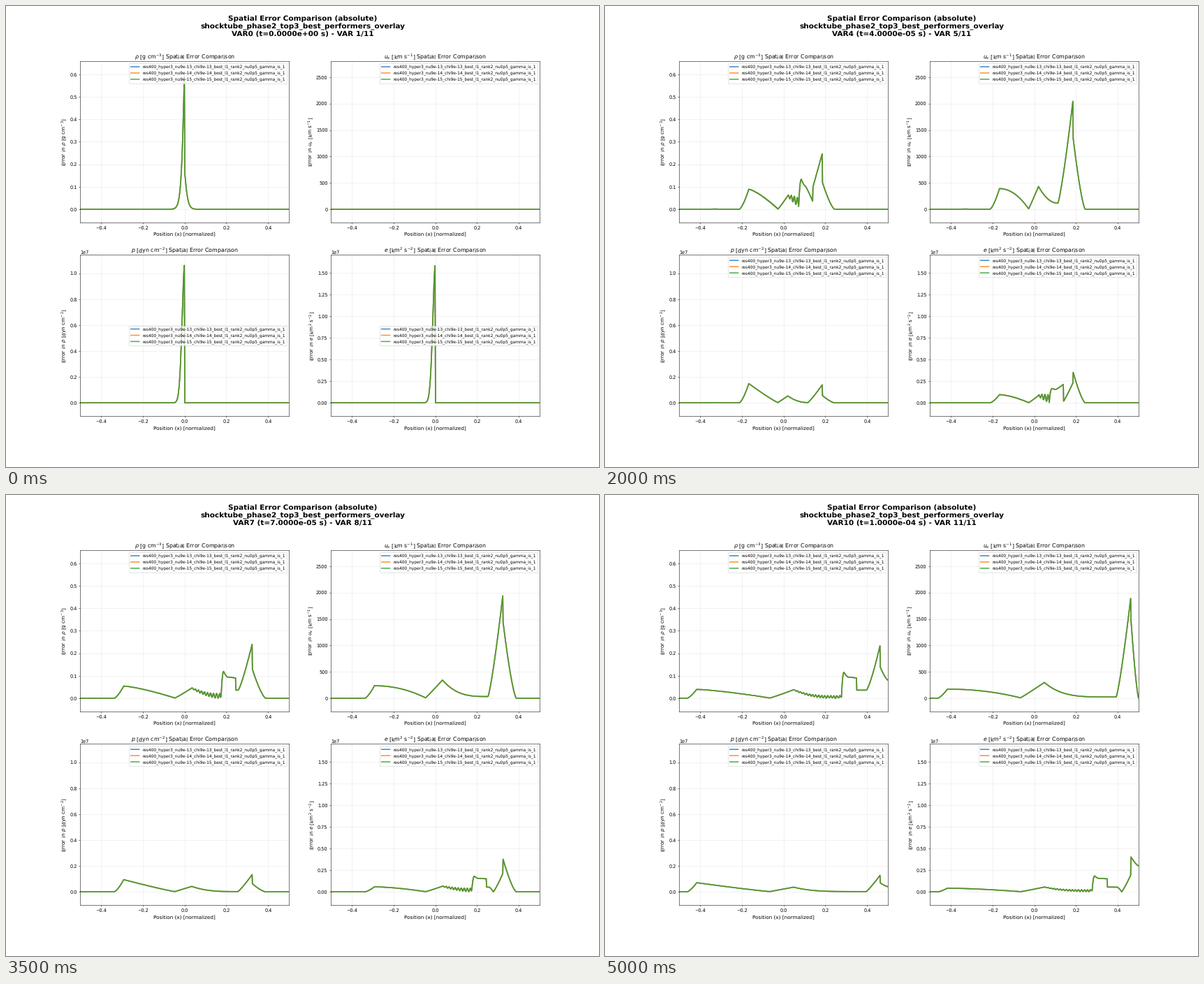
Write a matplotlib script that moves like this. It is 849 by 660 pixels and loops after 5.5 s.

```python
import numpy as np
import matplotlib.pyplot as plt
from matplotlib.animation import FuncAnimation

W, H, DPI = 849, 660, 47.15
STEPS = 11
OVERSHOOT = {1: 2, 2: 4, 6: 1}  # solver time past the output time, in ns

plt.rcParams.update({"font.family": "DejaVu Sans", "text.hinting": "none"})


def path(knots):
    """Join (x, y, bend) knots; bend > 0 starts flat, bend < 0 ends flat."""
    xs, ys = [-0.5], [0.0]
    for x, y, *bend in knots:
        x0, y0 = xs[-1], ys[-1]
        s = np.linspace(0, 1, 60)[1:] if x - x0 > 0.003 else np.ones(1)
        p = bend[0] if bend else 1
        w = s**p if p > 0 else 1 - (1 - s) ** -p
        xs.extend(x0 + (x - x0) * s)
        ys.extend(y0 + (y - y0) * w)
    return np.array(xs), np.array(ys)


# Wave positions: all of them travel at a constant speed.
def fan(k):
    return -0.0416 * k


def zero(k):
    return -0.0065 * k - 0.001


def middle(k):
    return 0.0047 * k + 0.0015


def contact(k):
    return max(0.034 * k - 0.063, zero(k) + 0.002)


def shelf(k):
    return 0.035 * k - 0.001


def plain(k):
    return 0.0465 * k - 0.07


def shock(k):
    return 0.0461 * k + 0.0005


def head(k, peak, low, bend):
    """Rarefaction: smooth rise, peak and the fall to the sign change."""
    return [(fan(k) - 0.046, 0), (fan(k), peak, 1.4 + 1.4 / k**2), (zero(k), low, bend)]


def step_wave(k, hill, base, peak, mid, end, after):
    """Central hill, contact jump, shelf and the flat stretch before the ramp."""
    j, e = contact(k), shelf(k)
    knots = []
    if middle(k) < j:
        knots = [(middle(k), hill, 1.1), (j, base, -max(1, 0.35 * k - 0.5))]
    return knots + [(j + 0.012, peak, -2.2), (j + 0.45 * (e - j), mid, -1.5),
                    (e, end, 1.2), (e + 0.0015, after),
                    (max(e, plain(k)) + 0.0016, after)]


def tail(k, top, bend, post, wall):
    """Ramp to the shock and the decay that may run into the wall."""
    foot = 0.048 * k + 0.052
    end = wall if foot > 0.5 else 0
    return [(shock(k), top, bend), (shock(k) + 0.0015, post),
            (min(foot, 0.5), end, -1.4), (0.5, end)]


def ripple(x, a, b, size, wavelength=0.0145):
    s = np.clip((x - a) / (b - a), 0, 1)
    return np.where(s < 1, -size * np.sqrt(s) * np.cos(2 * np.pi * (b - x) / wavelength), 0)


def grid_noise(k, x, size):
    """Ripples on the fan, at the contact and a faint bump ahead of the fan."""
    y = ripple(x, fan(k), zero(k), 0.015 * k**-1.5, 0.0075)
    if middle(k) < contact(k):
        y += ripple(x, middle(k), contact(k), size)
    return y


def precursor(k, x, size):
    return size * (k > 1) * np.exp(-(((x + 0.083 * k) / 0.014) ** 2))


def start_pulse(size, right, width, power):
    """Smeared initial jump at x = 0."""
    x = np.linspace(-0.5, 0.5, 400)
    y = np.exp(-((np.abs(x) / width) ** power))
    return x, np.where(x < 0, size, right) * y


def density(k):
    if k == 0:
        return start_pulse(0.63, 0.17, 0.0123, 1.2)
    knots = head(k, 0.305 * k**-0.89, 0.001, 1.35)
    knots += step_wave(k, hill=0.12 * k**-0.5, base=0.48 / k**2,
                       peak=min(0.19, 0.112 + 0.34 / k**2),
                       mid=max(0.094, 0.14 - 0.009 * k),
                       end=np.clip(0.0275 * (k - 2.7), 0.003, 0.09),
                       after=max(0.036, 0.215 - 0.029 * k))
    knots += tail(k, 0.255 - 0.0022 * k, 1 + 0.3 * np.clip(k / 4 - 1, 0, 1),
                  0.105 + 0.0033 * k, 0.08)
    x, y = path(knots)
    return x, np.abs(y + grid_noise(k, x, 0.08 / k) + precursor(k, x, 0.001))


def velocity(k):
    if k == 0:
        return np.array([-0.5, 0.5]), np.zeros(2)
    knots = head(k, 1350 * k**-0.895, 8, 2.1 - 0.8 / k**2)
    bend = -1.9
    if plain(k) > middle(k):
        bend = 1.25
        knots += [(middle(k), 750 * k**-0.4, 1.05),
                  (plain(k) - 0.003, 22 + 413 * np.exp(-0.745 * (k - 2)), -0.64 - 0.36 * k)]
    knots += tail(k, 1700 + 846 * k**-0.65, bend, 1640 - 790 * k**-0.7, 0)
    x, y = path(knots)
    return x, y + precursor(k, x, 4)


def pressure(k):
    if k == 0:
        x, y = start_pulse(1.07, 0, 0.0172, 1.8)
        return x, y * 1e7
    knots = head(k, 0.46 * k**-0.815, 0.002, -1.12)
    knots += [(middle(k), min(0.06, 0.095 * k**-0.42)),
              (max(plain(k), 0.02 * k), 0.002, -0.64 - 0.36 * k)]
    knots += tail(k, 0.147 - 0.002 * k, 1.15, 0.048 + 0.002 * k, 0.04)
    x, y = path(knots)
    return x, (y + precursor(k, x, 0.002)) * 1e7


def energy(k):
    if k == 0:
        x, y = start_pulse(1.6, 0, 0.0172, 1.8)
        return x, y * 1e7
    base = 0.3 * k**-1.35
    knots = head(k, 0.32 * k**-0.88, 0.002, 1.6)
    knots += step_wave(k, hill=0.16 * k**-0.46, base=base,
                       peak=max(0.12, 0.187 - 0.35 / k**2), mid=0.155,
                       end=max(0.151, 0.375 - 0.0405 * k),
                       after=max(-0.055, 0.21 - 0.0475 * k))
    knots += tail(k, 0.253 - 0.006 * k, 1.4 if k > 4 else 1.1,
                  0.318 + 0.0085 * k, 0.3)
    x, y = path(knots)
    return x, np.abs(y + grid_noise(k, x, base)) * 1e7


PANELS = [
    (density, r"$\rho$", r"[g cm$^{-3}$]", 0.598),
    (velocity, r"$u_x$", r"[km s$^{-1}$]", 2546),
    (pressure, r"$p$", r"[dyn cm$^{-2}$]", 1.038e7),
    (energy, r"$e$", r"[km$^2$ s$^{-2}$]", 1.554e7),
]

fig, axes = plt.subplots(2, 2, figsize=((W + 0.001) / DPI, (H + 0.001) / DPI), dpi=DPI)
title = fig.suptitle("", fontsize=16, fontweight="bold", linespacing=1.13)
lines, legends = [], []

for ax, (_, symbol, unit, peak) in zip(axes.flat, PANELS):
    lines.append([
        ax.plot([], [], color=color, lw=2.5, alpha=0.8,
                label=f"res400_hyper3_nu9e-{n}_chi9e-{n}_best_l1_rank2_nu0p5_gamma_is_1")[0]
        for n, color in zip((13, 14, 15), ("tab:blue", "tab:orange", "tab:green"))
    ])
    ax.set_xlim(-0.5, 0.5)
    ax.set_ylim(-0.1 * peak, 1.1 * peak)
    ax.set_title(f"{symbol} {unit} Spatial Error Comparison", fontsize=12)
    ax.set_xlabel("Position (x) [normalized]", fontsize=11)
    ax.set_ylabel(f"Error in {symbol} {unit}", fontsize=11, labelpad=3)
    ax.grid(True, alpha=0.3)
    legend = ax.legend(loc="upper right", fontsize=9)
    for handle in legend.legend_handles:
        handle.set_snap(False)
    legends.append(legend)


def update(k):
    time = k * 1e-5 + OVERSHOOT.get(k, 0) * 1e-9
    title.set_text("Spatial Error Comparison (absolute)\n"
                   "shocktube_phase2_top3_best_performers_overlay\n"
                   f"VAR{k} (t={time:.4e} s) - VAR {k + 1}/{STEPS}")
    for group, (curve, *_) in zip(lines, PANELS):
        x, y = curve(k)
        for line in group:
            line.set_data(x, y)
    for legend in legends[2:]:
        legend.set_loc("center right" if k == 0 else "upper right")


anim = FuncAnimation(fig, update, frames=STEPS, interval=500, repeat=True,
                     repeat_delay=0, init_func=lambda: update(0))
plt.show()
```
